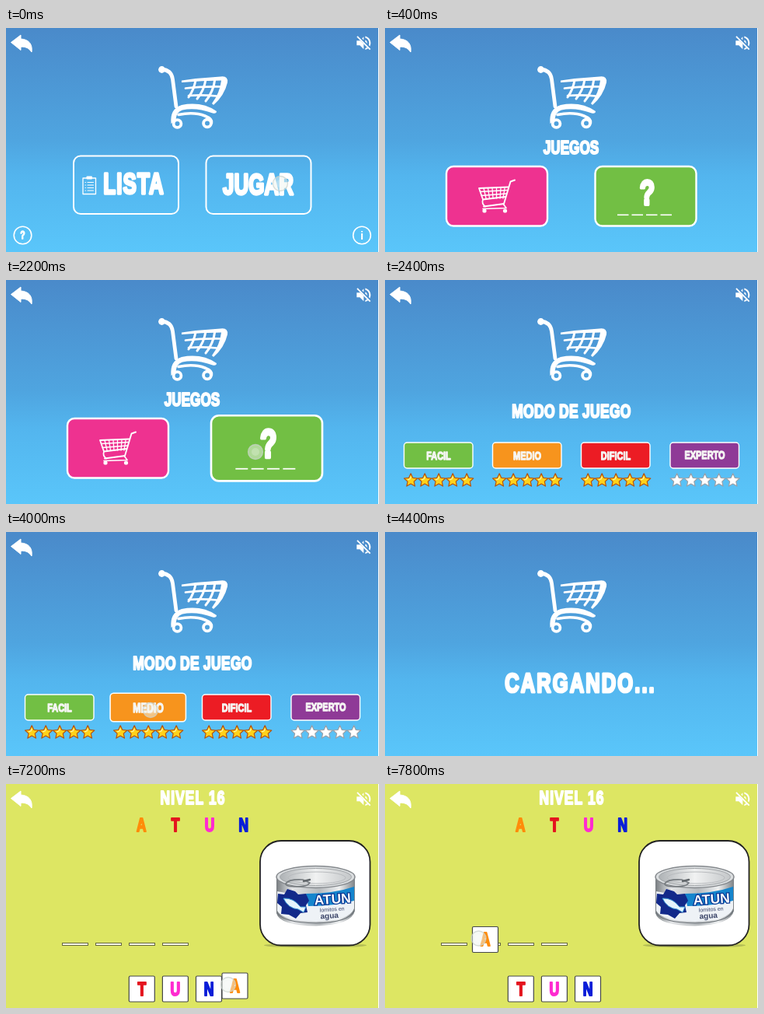
Recreate the animation shown at these times as an HTML page. Size 480x288 px, loop 8 s.

```html
<!DOCTYPE html>
<html lang="es">
<head>
<meta charset="utf-8">
<title>Juego de palabras</title>
<style>
html, body { margin: 0; width: 480px; height: 288px; overflow: hidden; }
svg { display: block; }
.face { font: bold 20px "Liberation Sans", Arial, sans-serif; stroke-linejoin: round; }
.line { fill: none; stroke: #fff; stroke-linecap: round; stroke-linejoin: round; }
</style>
</head>
<body>
<svg id="stage" width="480" height="288" viewBox="0 0 480 288"></svg>
<script>
const LOOP = 8000;
const NARROW = 0.71; // one condensed, heavy look for all lettering
const HEAVY = 0.09;
const COLORS = { A: '#ff8c0a', T: '#e4151f', U: '#ff2bd0', N: '#0a1ed8' };
const LEVELS = [
  ['FACIL', 24.5, '#72bf44'], ['MEDIO', 138.5, '#f7941d'],
  ['DIFICIL', 252.5, '#ec1c24'], ['EXPERTO', 367, '#8f3a97'],
];

// Centred word, placed by the bottom and height of its capitals.
function word(s, x, bottom, cap, fill = '#fff', space = 0) {
  const size = cap / (0.688 + HEAVY), pen = size * HEAVY;
  return `<text class="face" transform="translate(${x} ${bottom - pen / 2}) scale(${NARROW} 1)" text-anchor="middle"
    style="font-size:${size}px;letter-spacing:${space}px" fill="${fill}" stroke="${fill}" stroke-width="${pen}">${s}</text>`;
}
const line = (d, w) => `<path class="line" d="${d}" stroke-width="${w}"/>`;
const box = (x, y, w, h, r, fill, stroke, sw) =>
  `<rect x="${x}" y="${y}" width="${w}" height="${h}" rx="${r}" fill="${fill}" stroke="${stroke}" stroke-width="${sw}"/>`;
const group = (id, body) => `<g id="${id}">${body}</g>`;
const dot = (x, y, r, fill = '#fff') => `<circle cx="${x}" cy="${y}" r="${r}" fill="${fill}"/>`;
const ring = (x, y, r, w) => `<circle class="line" cx="${x}" cy="${y}" r="${r}" stroke-width="${w}"/>`;

function star(cx, cy, r, gold) {
  const pts = Array.from({ length: 10 }, (_, i) => {
    const a = i * Math.PI / 5 - Math.PI / 2, k = i % 2 ? r * 0.48 : r;
    return `${(cx + k * Math.cos(a)).toFixed(1)},${(cy + k * Math.sin(a)).toFixed(1)}`;
  }).join(' ');
  const [fill, edge] = gold ? ['#ffd21a', '#b5520c'] : ['#fff', '#9aa0a8'];
  return `<polygon points="${pts}" fill="${fill}" stroke="${edge}" stroke-width="1.2" stroke-linejoin="round"/>` +
    (gold ? `<path d="M${cx - 4} ${cy - 1}L${cx - 1} ${cy - 2}L${cx} ${cy - 5}" fill="none" stroke="#fff3a0" stroke-width="1.3"/>` : '');
}

const bigCart =
  dot(200.5, 53.5, 4.4) +
  line('M200 53Q213 54 214.5 66L219 101', 4.8) +
  // basket
  `<path d="M226 67.5Q250 64 276 62.5Q286 61 285 70Q281 87 267 99L265 97Q275 84 277 67.5Q252 67.5 226 70Z" fill="#fff"/>` +
  line('M231 77.5Q252 75 278 75.5', 2.7) +
  line('M235 87Q252 85.5 271 87.5', 2.7) +
  line('M244 67Q242 79 235 89', 3) +
  line('M257 66Q255 80 246 91', 3) +
  line('M269 65Q267 82 257 94', 3) +
  // frame and wheels
  `<path d="M212.5 123Q210.5 104 226 99Q252 94 271 107Q271 110.500 266 109.5Q244 101.500 227 105.500Q219 108 218.500 118Z" fill="#fff"/>` +
  line('M222 111.5Q242 107.5 256 113Q266 117 264.5 122', 3.6) +
  ring(220.5, 123, 4.9, 3.8) + ring(259, 122.5, 4.9, 3.8);

const smallCart =
  line('M167 195.5L161.5 197.5L153 226L127 229.5', 1.9) +
  line('M121 206L159 204.5M121 206L126 220.5L155 217', 1.8) +
  line('M122.5 210.5L157.5 208.5M124 215.5L156 213', 1.3) +
  [127, 132.5, 138, 143.5, 149, 154].map((x, i) => line(`M${x} 206L${x + 3 - i} 219`, 1.3)).join('') +
  line('M126 220.5Q124 226 129 229.5M126 232.5L156 231.5L152 226', 1.7) +
  dot(128, 235, 2.6) + dot(154.5, 235, 2.6);

const muted = `<g transform="translate(448.3 7.3)" fill="#fff">
  <path d="M3 9H7.700L12 13.300V20L7 15H3ZM12 4V8.200L9.900 6.100Z"/>
  <path d="M14 8Q16.500 9.200 16.500 12L16.400 12.600L14 10.200Z"/>
  <path d="M14 3.200C18 4.100 21 7.700 21 12Q21 14.200 20 16.200L18.500 14.600Q19 13.400 19 12C19 8.800 16.900 6.200 14 5.300Z"/>
  <path d="M4.300 3L21 19.700L19.700 21L3 4.300Z"/>
  <path d="M16.300 17.500L17.700 19Q16 20.300 14 20.800V18.700Q15.300 18.300 16.300 17.500Z"/></g>`;
const nav =
  `<path d="M6.500 18.500L19 9V14C29 14.500 34.500 20.500 33 31C29.500 26 26 24 19 24.200V28.500Z" fill="#fff" stroke="#fff" stroke-linejoin="round"/>` + muted;

const clipboard =
  line('M99 193H115.5V213.5H99Z', 1.3) +
  box(103.5, 190.5, 7.5, 4, 1, '#fff', 'none', 0) +
  [198.5, 202, 205.5, 209].map(y => line(`M102 ${y}H102.5M105 ${y}H112.5`, 1.1)).join('');

const menu =
  box(87, 164.5, 135, 74.5, 9, 'none', '#fff', 2) + clipboard + word('LISTA', 164.5, 215, 28.5, '#fff', 1.5) +
  group('play', box(257.5, 164.5, 135, 74.5, 9, 'none', '#fff', 2) + word('JUGAR', 324.5, 215.3, 28.5)) +
  ring(21.5, 266.5, 11.3, 1.6) + word('?', 21.5, 272, 11.5) +
  ring(458, 266.5, 11.3, 1.6) +
  `<text class="face" x="458" y="272" text-anchor="middle" fill="#fff" style="font-size:15px">i</text>`;

const games =
  word('JUEGOS', 239.5, 162.7, 18.8) +
  box(79, 178, 130, 76.5, 9, '#ee3290', '#fff', 2.4) + smallCart +
  group('guess', box(270.5, 178, 130, 76.5, 9, '#72bf44', '#fff', 2.4) + word('?', 337.5, 228.7, 35) +
    [299, 317.5, 336, 354.5].map(x => `<rect x="${x}" y="239.5" width="14.5" height="1.6" fill="#fff"/>`).join(''));

const modes =
  word('MODO DE JUEGO', 240, 177.7, 19.2, '#fff', 0.4) +
  LEVELS.map(([name, x, color], i) => {
    const dy = i === 3 ? -1 : 0;
    const stars = [0, 1, 2, 3, 4].map(n => star(x + 8.7 + n * 18, 257.8, 9, i < 3)).join('');
    return stars + group('level' + i, box(x, 209, 88.5, 33, 4, color, '#fff', 1.4) +
      word(name, x + 44.5, 231.7 + dy, 12, '#f6f6f4'));
  }).join('');

const loading = word('CARGANDO...', 251.5, 207.6, 28, '#fff', 2.9);

const tin =
  `<path d="M348 121V166Q352 182 399 182.500Q445 181 449 163V118Z" fill="url(#metal)"/>
  <path d="M349 138Q398 148 448 133V160Q442 176 399 177Q356 176 349 163Z" fill="#eef2f6"/>
  <path d="M386 141Q422 141 448 132V150Q424 157 389 157Z" fill="#1585cd"/>
  <path d="M350 141L358 142L362 135L372 138L376 142L386 141L390 150L386 156L388 165L379 166L373 173L364 168L354 167L355 158L349 153Z" fill="#12298a"/>
  <path d="M357 147Q370 146 379 158L386 158L383 165L376 161Q363 160 357 147Z" fill="#e6f4fc" stroke="#3795d3"/>
  <path d="M349 166Q357 178 399 179Q441 178 448 163" fill="none" stroke="#6c7379" stroke-width="1.2"/>
  <ellipse cx="398.500" cy="119.500" rx="50.500" ry="14" fill="#dadddf" stroke="#85898d" stroke-width="1.4"/>
  <ellipse cx="398.500" cy="119.500" rx="46" ry="11" fill="url(#lid)" stroke="#a1a5a8"/>
  <ellipse cx="400" cy="120.500" rx="37" ry="7.500" fill="none" stroke="#b8bbbe"/>
  <path d="M360 128Q364 122 382 123L391 127Q388 132 374 132Q359 132 360 128Z" fill="none" stroke="#777c80" stroke-width="1.600"/>
  <path d="M383 125L391 123" stroke="#62676b" stroke-width="2.500" stroke-linecap="round"/>
  <g font-family="'Liberation Sans', Arial, sans-serif" text-anchor="middle" fill="#3a4468" transform="rotate(-4 420 152)">
  <text x="420.500" y="154" font-size="17.500" font-weight="bold" fill="#fff" stroke="#0a3592" stroke-width="2.500" paint-order="stroke">ATUN</text>
  <text x="419" y="163.500" font-size="7">lomitos en</text>
  <text x="415" y="172.500" font-size="10" font-weight="bold">agua</text></g>`;

const tile = (c, x, y) => box(x, y, 33, 33, 1.5, '#fff', '#45484a', 1.2) + word(c, x + 16.5, y + 26, 19.3, COLORS[c]);

const puzzle =
  `<rect width="480" height="288" fill="#dde663"/>` +
  word('NIVEL 16', 240.5, 26.8, 19, '#fff', 1.6) +
  [...'ATUN'].map((c, i) => word(c, 174.3 + i * 43.8, 61.8, 19, COLORS[c])).join('') +
  [72, 115, 158, 201].map(x => box(x + .5, 204.5, 33, 3, 0, '#f6f6e4', '#66683f', 1)).join('') +
  `<ellipse cx="398" cy="207.5" rx="66" ry="3" fill="#98a04c" opacity=".6"/>` +
  box(327, 73, 141.5, 134.5, 27, '#fff', '#222', 1.8) + tin +
  [...'TUN'].map((c, i) => tile(c, 158.3 + i * 43.1, 247)).join('') +
  group('drag', tile('A', 0, 0));

const stage = document.getElementById('stage');
stage.innerHTML =
  `<defs>
  <linearGradient id="sky" x2="0" y2="1"><stop stop-color="#4a8aca"/><stop offset=".5" stop-color="#4fa5e0"/><stop offset=".66" stop-color="#53b5ee"/><stop offset="1" stop-color="#5ac6fa"/></linearGradient>
  <linearGradient id="metal"><stop stop-color="#777c80"/><stop offset=".2" stop-color="#e3e5e7"/><stop offset=".55" stop-color="#b6babd"/><stop offset=".8" stop-color="#eef0f1"/><stop offset="1" stop-color="#7e8387"/></linearGradient>
  <linearGradient id="lid"><stop stop-color="#aeb2b5"/><stop offset=".5" stop-color="#f1f2f2"/><stop offset="1" stop-color="#c4c7c9"/></linearGradient>
  </defs><rect width="480" height="288" fill="url(#sky)"/>` + bigCart +
  group('menu', menu) + group('games', games) + group('modes', modes) +
  group('loading', loading) + group('puzzle', puzzle) + group('nav', nav) +
  `<rect x="479" width="1" height="288" fill="#fff"/>` +
  group('touch', `<circle r="9.5" fill="#eef3ee" fill-opacity=".5" stroke="#c9d2cc" stroke-opacity=".75" stroke-width="1.3"/>
    <circle r="5" fill="#fff" fill-opacity=".22"/>`);

// time, scene, touch point, pressed button
const STEPS = [
  [0, 'menu', [353, 200]],
  [200, 'menu', [353, 200], 'play'],
  [400, 'games'],
  [2000, 'games', [321, 221]],
  [2200, 'games', [321, 221], 'guess'],
  [2400, 'modes'],
  [4000, 'modes', [186, 229], 'level1'],
  [4200, 'loading'],
  [5600, 'puzzle'],
  [7200, 'puzzle', [286, 258]],
  [7400, 'puzzle', [229, 239]],
  [7600, 'puzzle', [158, 205]],
  [7800, 'puzzle', [120.5, 198.5]],
];
const CENTERS = { play: [325, 202], guess: [335.5, 216], level1: [182.7, 225.5] };
const SCENES = ['menu', 'games', 'modes', 'loading', 'puzzle'];
const el = id => document.getElementById(id);
const show = (id, on) => { el(id).style.display = on ? '' : 'none'; };

function draw(now) {
  const t = now % LOOP;
  const [, scene, touch, pressed] = STEPS.findLast(s => s[0] <= t);
  SCENES.forEach(id => show(id, id === scene));
  show('nav', scene !== 'loading');
  show('touch', touch);
  if (touch) el('touch').setAttribute('transform', `translate(${touch})`);
  for (const [id, [x, y]] of Object.entries(CENTERS)) {
    const k = id === pressed ? 1.1 : 1;
    el(id).setAttribute('transform', `translate(${x} ${y}) scale(${k}) translate(${-x} ${-y})`);
  }
  const held = scene === 'puzzle' && touch;
  const [x, y] = held ? [touch[0] - 8, touch[1] - 15] : [287.6, 247];
  el('drag').setAttribute('transform', `translate(${x} ${y})`);
}

const start = performance.now();
function tick() {
  draw(performance.now() - start);
  requestAnimationFrame(tick);
}
tick();
</script>
</body>
</html>
```
